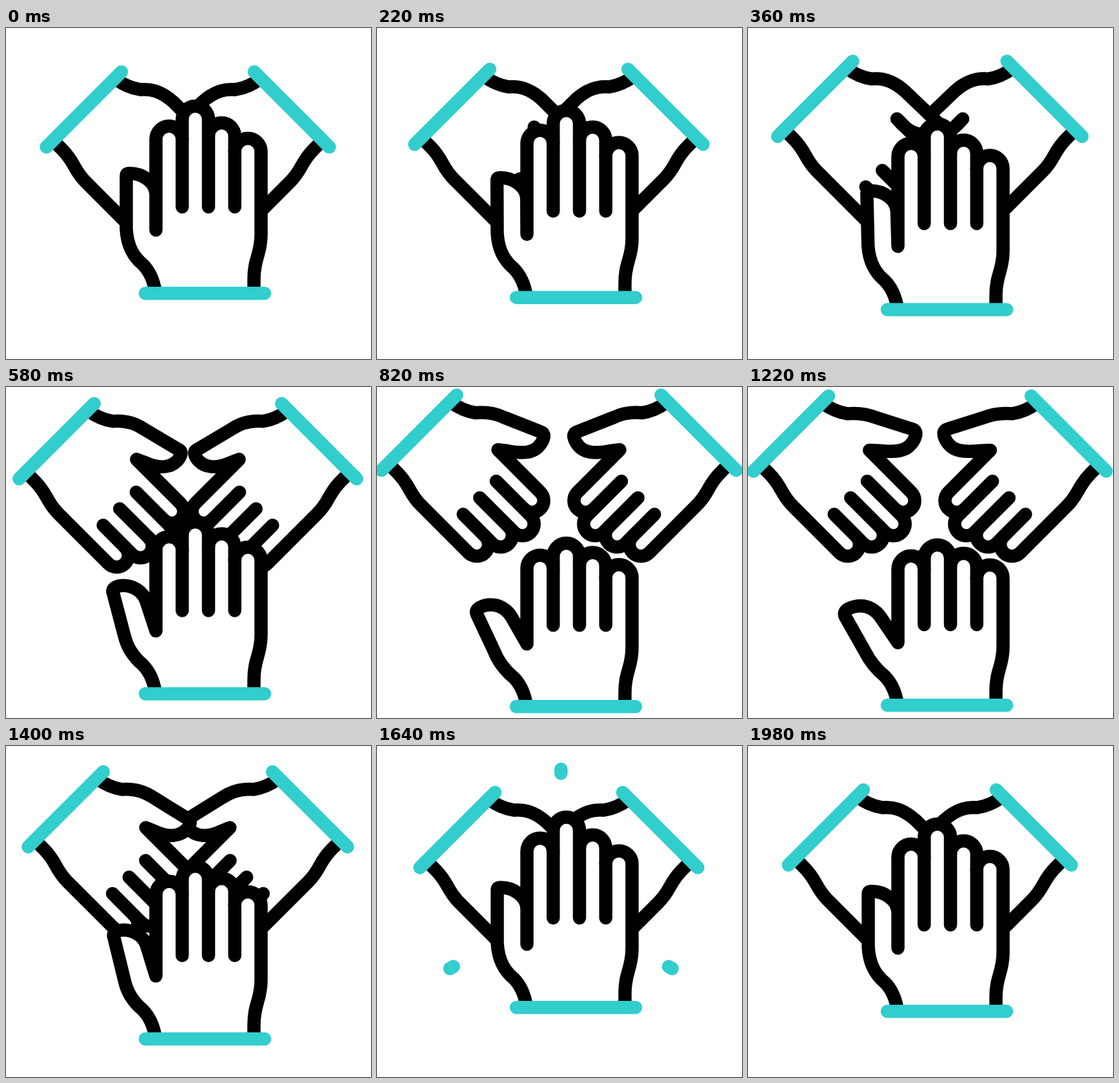
Recreate the animation shown at these times as an HTML page. Size 566 by 513 pixels, loop 2180 ms.

```html
<!DOCTYPE html>
<html lang="en">
<head>
<meta charset="utf-8">
<title>Hands together</title>
<style>
  html, body { margin: 0; width: 100%; height: 100%; overflow: hidden; background: #fff; }
  svg { display: block; width: 100%; height: 100%; }
  path { stroke-linecap: round; stroke-linejoin: round; }
  .skin { fill: #fff; stroke: #000; }
  .accent { fill: none; stroke: #32cdcd; }
</style>
</head>
<body>
<svg id="stage" viewBox="0 0 566 513"></svg>
<script>
const LOOP = 2180;
const SIDE_SCALE = 0.89;
const STROKE = 20.5;
const PALM_EDGE = 395.5;
const FINGER_WIDTH = 40.75;

// Keys are [ms, value]: distance moved apart, and how far the hands open.
const SPREAD = [[120, 0], [360, 25], [580, 64], [820, 84], [1000, 92], [1220, 82], [1640, -6], [1980, 0]];
const OPENING = [[120, 0], [360, 0.06], [580, 0.57], [820, 0.88], [1060, 1.03], [1220, 1], [1640, -0.11], [1980, 0]];

// Lengths from the cuff when open, pinky first; "grow" is added when closed.
const FINGERS = [{ reach: 197, grow: 23 }, { reach: 215, grow: 29 }, { reach: 228, grow: 42 }, { reach: 211, grow: 28 }];
const FRONT = { gap: 125, gapGrow: 9, web: 97, webGrow: 1, tip: f => f.grow };
const SIDE = { gap: 152.5, gapGrow: 19.5, web: 117, webGrow: 9, tip: () => 19, extra: 9.5, side: true };

const stage = document.getElementById('stage');

function add(parent, tag, attrs = {}) {
  const el = document.createElementNS('http://www.w3.org/2000/svg', tag);
  for (const name in attrs) el.setAttribute(name, attrs[name]);
  return parent.appendChild(el);
}

const lerp = (a, b, u) => a + (b - a) * u;
const clamp = u => Math.min(1, Math.max(0, u));
const easeOut = u => 1 - (1 - clamp(u)) ** 2;
const easeInOut = u => { u = clamp(u); return u * u * (3 - 2 * u); };

// Smooth curve through the keys without extra overshoot.
function curve(keys, t) {
  const last = keys.length - 1;
  if (t <= keys[0][0]) return keys[0][1];
  if (t >= keys[last][0]) return keys[last][1];
  const secant = i => (keys[i + 1][1] - keys[i][1]) / (keys[i + 1][0] - keys[i][0]);
  const slope = i => {
    if (i === 0 || i === last) return 0;
    const a = secant(i - 1), b = secant(i);
    return a * b <= 0 ? 0 : 2 * a * b / (a + b);
  };
  const i = keys.findIndex(key => key[0] > t) - 1;
  const [t0, v0] = keys[i], [t1, v1] = keys[i + 1];
  const h = t1 - t0, u = (t - t0) / h, w = 1 - u;
  return v0 * (1 + 2 * u) * w * w + slope(i) * h * u * w * w
    + v1 * u * u * (3 - 2 * u) - slope(i + 1) * h * u * u * w;
}

// From the web over the thumb tip to the wrist.
function thumbPath(open, web, side) {
  const o = Math.max(0, open);
  const dx = side ? 2.5 : 0;
  const dy = side ? -2 - 5 * o : 0;
  const at = (x, y, moveX, moveY) => [x + moveX * o + dx, y + moveY * o + dy];
  const root = at(232.5, -153, -26.5, 17);
  if (side) root[1] = (root[1] - web) / 2, root[0] = (root[0] + 232.5) / 2;
  const over = [at(232, -173, -34, 25), at(211, -186, -25, 32), at(192, -186, -17, 32)];
  const tip = [at(188, -186, -25, 32), at(186.5, -186, -42, 38), at(186.5, -181, -35.5, 44)];
  const base = at(186.5, -100, -5.5, 16 + (side ? 5 : 0));
  const bend = [188 + dx, -70, 200 + dx, -55, 212 + dx, -45];
  return `L${232.5} ${-web}L${root}C${over}C${tip}L${base}C${bend}C222 -35 229 -21 232 -1`;
}

function handPaths(kind, open) {
  const closed = 1 - open;
  const tips = FINGERS.map(f => -(f.reach + (kind.extra || 0) + kind.tip(f) * closed));
  const gap = kind.gap + kind.gapGrow * closed + (kind.side ? 0 : 35 * Math.max(0, -open));
  const radius = FINGER_WIDTH / 2;
  let outline = `M384.5 -1V-22C384.5 -55 ${PALM_EDGE} -60 ${PALM_EDGE} -91`;
  let gaps = '';
  tips.forEach((y, i) => {
    const x = PALM_EDGE - FINGER_WIDTH * (i + 1);
    outline += `V${y}A${radius} ${radius} 0 0 0 ${x} ${y}`;
    if (i < 3) gaps += `M${x} ${Math.max(y, tips[i + 1])}V${-gap}`;
  });
  outline += thumbPath(open, kind.web + kind.webGrow * closed, kind.side);
  return [outline, gaps];
}

function makeHand(parent, kind) {
  const group = add(parent, 'g', { 'stroke-width': kind.side ? STROKE / SIDE_SCALE : STROKE });
  const parts = [0, 1].map(() => add(group, 'path', { class: 'skin' }));
  add(group, 'path', { class: 'accent', d: 'M216 0H401' });
  return (transform, open) => {
    group.setAttribute('transform', transform);
    handPaths(kind, open).forEach((d, i) => parts[i].setAttribute('d', d));
  };
}

const mirrored = add(stage, 'g', { transform: 'translate(564 0) scale(-1 1)' });
const poseRight = makeHand(mirrored, SIDE);
const poseLeft = makeHand(stage, SIDE);
const poseFront = makeHand(stage, FRONT);
const sparks = [0, 120, 240].map(turn => ({
  radius: turn ? 199 : 209.5,
  el: add(stage, 'path', {
    class: 'accent', 'stroke-width': STROKE, transform: `translate(285.3 245.5) rotate(${turn})`
  })
}));

function draw(t) {
  const spread = curve(SPREAD, t);
  const open = curve(OPENING, t);
  const shift = 0.66 * spread;
  const sideways = `translate(${120.8 - shift} ${126.3 - shift}) rotate(135) scale(${SIDE_SCALE}) translate(-308.5 0)`;
  poseRight(sideways, open);
  poseLeft(sideways, open);
  poseFront(`translate(0 ${411.3 + spread})`, open);

  const head = easeOut((t - 1480) / 150);
  const tail = easeInOut((t - 1512) / 170);
  for (const { el, radius } of sparks) {
    const y = u => -radius + 44 * (1 - u);
    el.style.display = t >= 1490 && t < 1680 ? '' : 'none';
    el.setAttribute('d', `M0 ${y(tail)}V${y(head)}`);
  }
}

const start = performance.now();
function tick() {
  draw((performance.now() - start) % LOOP);
  requestAnimationFrame(tick);
}
draw(0);
requestAnimationFrame(tick);
</script>
</body>
</html>
```
